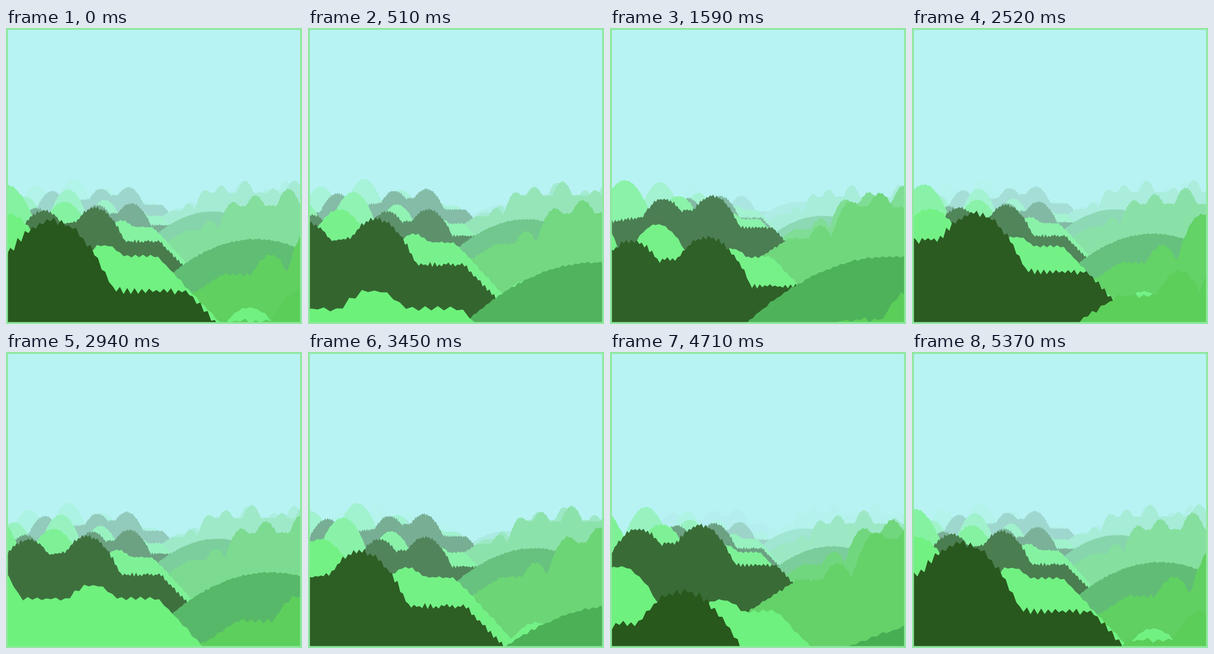
Recreate the animation shown at these times as an HTML page with a canvas. Size 540 by 540 pixels, loop 5.4 s.

```html
<!DOCTYPE html>
<html lang="en">
<head>
<meta charset="utf-8">
<title>Misty hills</title>
<style>
  html, body { margin: 0; width: 100%; height: 100%; overflow: hidden; background: #b8f3f4; }
  canvas { display: block; width: 540px; height: 540px; }
</style>
</head>
<body>
<canvas id="stage" width="540" height="540"></canvas>
<script>
const ctx = document.getElementById('stage').getContext('2d');
const SIZE = 540, CENTER = SIZE / 2, CYCLE = 2700, STEP = 30;
const NEAR = 700, REACH = 1700;
const SKY = [184, 243, 244];

// A kind is a mountain shape seen from its crest. Hills are [x, y] offsets from
// the crest; outward lies the back ground, inward a shelf that drops off at its edge.
const kinds = {
  dark: {
    color: [39, 87, 27], side: -1, hills: [[0, 0], [-178, 10], [-500, 25]], width: 74,
    back: 38, tilt: 0.15, shelf: 115, edge: 222, drop: 1.05, rough: 7, tooth: 6
  },
  mint: {
    color: [108, 241, 122], side: -1, hills: [[0, 0], [-222, -73], [-447, -138], [-710, -93], [330, 141]], width: 70,
    back: 25, tilt: 0, shelf: 25, edge: 122, drop: 1.07, rough: 4, tooth: 9
  },
  slope: {
    color: [72, 174, 82], side: 1, hills: [[0, 0]], width: 205,
    back: 80, tilt: 0, shelf: 300, edge: 400, drop: 1, rough: 3, tooth: 8
  },
  peak: {
    color: [90, 206, 88], side: 1, hills: [[0, 0], [-109, 86], [103, -29], [257, -60], [438, -13], [575, -62]], width: 48,
    back: 18, tilt: 0, shelf: 132, edge: 222, drop: 0.65, rough: 5, tooth: 8
  }
};

// Each ridge: kind, depth at time 0 (ms of travel), crest x and y, size.
const ridges = [
  ['peak', 842, 332, 91, 1],
  ['dark', 900, -168, 74, 1],
  ['mint', 1290, -118, 163, 1.04],
  ['peak', 1300, 385, 102, 1],
  ['slope', 1890, 350, 218, 1],
  ['dark', 1950, -209, 114, 1.03],
  ['mint', 2200, -130, 179, 1.03],
  ['peak', 2554, 370, 121, 1],
  ['slope', 2840, 300, 184, 1],
  ['dark', 2873, -119, 143, 1],
  ['mint', 3130, -75, 204, 0.93]
];

const mod = (a, n) => ((a % n) + n) % n;

function random(n, seed) {
  const v = Math.sin(n * 127.1 + seed * 311.7) * 43758.5453;
  return v - Math.floor(v);
}

// Height offset below the crest: the highest of the ground and all rounded hills.
function height(kind, x) {
  const out = kind.side * x;
  const ground = out > 0
    ? kind.back + kind.tilt * out
    : kind.shelf + kind.drop * Math.max(0, -out - kind.edge);
  const tops = kind.hills.map(([hx, hy]) => hy + 60 * ((x - hx) / kind.width) ** 2);
  return Math.min(ground, ...tops);
}

function ridgePath(kind, cx, cy, size, seed) {
  const path = new Path2D();
  path.moveTo(-REACH, 4 * REACH);
  for (let n = 0, x = -REACH; x <= REACH; n++, x += kind.tooth) {
    const tooth = (n % 2 ? 1 : -1) * kind.rough * random(n, seed);
    path.lineTo(x, cy + size * height(kind, (x - cx) / size) + tooth);
  }
  path.lineTo(REACH, 4 * REACH);
  path.closePath();
  return path;
}

function fogColor(color, depth) {
  const u = Math.min(1, Math.max(0, (depth - 700) / 4000));
  const fog = u * u * (3 - 2 * u);
  return `rgb(${color.map((c, i) => Math.round(c + (SKY[i] - c) * fog))})`;
}

const layers = ridges.map(([name, start, x, y, size], i) => {
  const kind = kinds[name];
  return { start, color: kind.color, path: ridgePath(kind, x, y, size, i + 1) };
});

function draw(time) {
  ctx.setTransform(1, 0, 0, 1, 0, 0);
  ctx.fillStyle = `rgb(${SKY})`;
  ctx.fillRect(0, 0, SIZE, SIZE);

  const visible = [];
  for (const layer of layers) {
    const first = mod(layer.start - time, CYCLE);
    for (const depth of [first, first + CYCLE]) if (depth > NEAR) visible.push({ layer, depth });
  }
  visible.sort((a, b) => b.depth - a.depth);
  for (const { layer, depth } of visible) {
    const s = 1000 / depth;
    ctx.setTransform(s, 0, 0, s, CENTER, CENTER);
    ctx.fillStyle = fogColor(layer.color, depth);
    ctx.fill(layer.path);
  }

  ctx.setTransform(1, 0, 0, 1, 0, 0);
  ctx.strokeStyle = '#90e8a0';
  ctx.lineWidth = 7;
  ctx.strokeRect(0, 0, SIZE, SIZE);
}

const began = performance.now();
function tick() {
  const elapsed = performance.now() - began;
  draw(Math.floor(elapsed / STEP) * STEP);
  requestAnimationFrame(tick);
}
tick();
</script>
</body>
</html>
```
